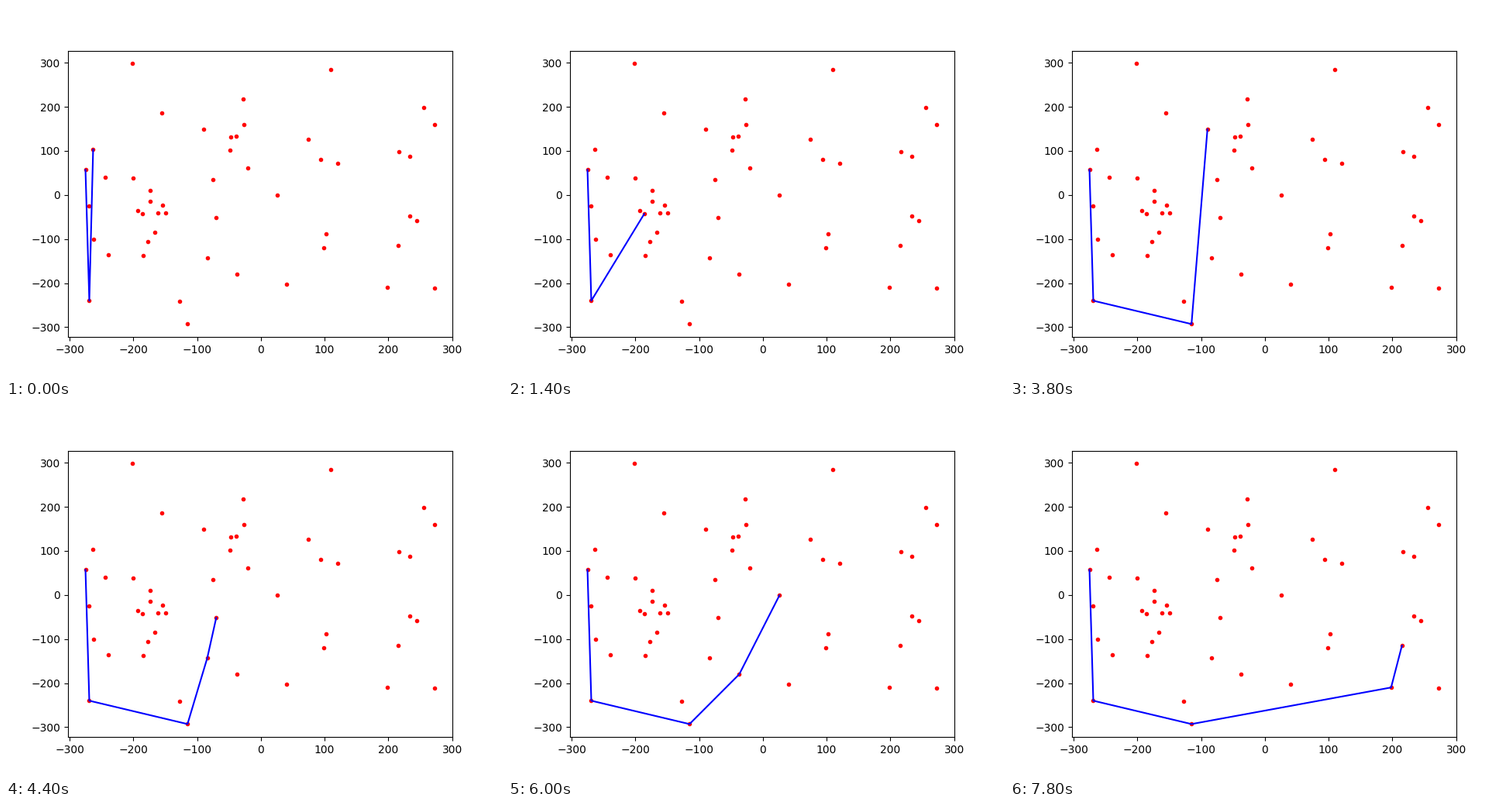
Animation of 640x480 px, one loop 8000 ms. Source, as a matplotlib script:

```python
import matplotlib.pyplot as plt
from matplotlib.animation import FuncAnimation

FRAMES = 40
STEP_MS = 200
FIRST = 4  # points already scanned when the loop starts

POINTS = sorted([
    (-275, 57), (-270, -25), (-269, -240), (-263, 103), (-262, -101),
    (-244, 40), (-239, -136), (-202, 298), (-200, 38), (-193, -36),
    (-186, -43), (-184, -138), (-177, -106), (-173, 10), (-173, -15),
    (-166, -84), (-161, -41), (-155, 186), (-154, -24), (-149, -41),
    (-128, -242), (-115, -293), (-90, 149), (-84, -143), (-75, 34),
    (-70, -52), (-49, 101), (-47, 131), (-39, 133), (-37, -180),
    (-28, 217), (-27, 159), (-21, 61), (26, -1), (40, -203),
    (74, 126), (94, 80), (99, -120), (102, -89), (109, 284),
    (121, 71), (198, -210), (215, -115), (217, 98), (234, 87),
    (234, -47), (245, -59), (256, 198), (273, 159), (273, -212),
])


def cross(o, a, b):
    return (a[0] - o[0]) * (b[1] - o[1]) - (a[1] - o[1]) * (b[0] - o[0])


def lower_hull(points):
    """Lower convex chain of points sorted by x."""
    hull = []
    for p in points:
        while len(hull) > 1 and cross(hull[-2], hull[-1], p) <= 0:
            hull.pop()
        hull.append(p)
    return hull


fig, ax = plt.subplots(figsize=(6.4, 4.8), dpi=100)
ax.plot(*zip(*POINTS), "r.")
chain, = ax.plot(*zip(*lower_hull(POINTS[:FIRST])), "b-")


def update(frame):
    chain.set_data(*zip(*lower_hull(POINTS[:FIRST + frame])))
    return chain,


anim = FuncAnimation(fig, update, frames=FRAMES, interval=STEP_MS,
                     repeat=True, repeat_delay=0)
plt.show()
```
